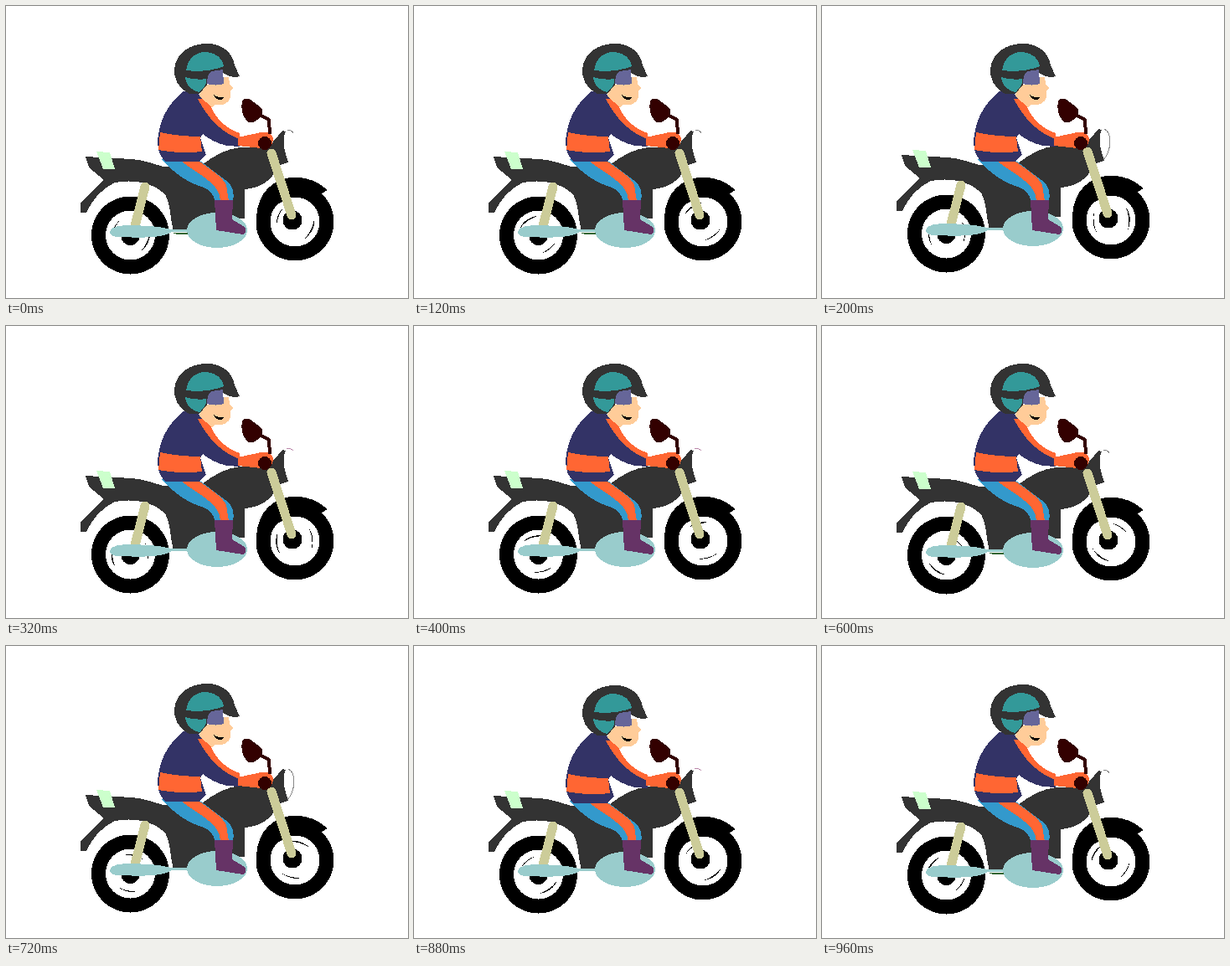
An HTML page that plays this animation: 480 by 349 pixels, repeating every 1000 ms.

```html
<!DOCTYPE html>
<html lang="en">
<head>
<meta charset="utf-8">
<title>Motorbike rider</title>
<style>
  html, body { margin: 0; width: 100%; height: 100%; overflow: hidden; background: #fff; }
  svg { display: block; width: 100vw; height: 100vh; }
</style>
</head>
<body>
<svg viewBox="0 0 480 349" shape-rendering="crispEdges">
  <defs>
    <g id="tyre">
      <circle r="46.5"/>
      <circle r="29.5" fill="#fff"/>
    </g>
    <g id="blades">
      <path d="M23 -4 Q25 9 12 20 Q22 8 23 -4Z"/>
      <path d="M-22 4 Q-23 -8 -13 -18 Q-21 -7 -22 4Z"/>
    </g>
  </defs>

  <g class="bob">
    <g transform="translate(148.5 274)">
      <use href="#tyre"/>
      <use href="#blades" class="spin"/>
      <circle cy="1" r="11"/>
    </g>
    <g transform="translate(345 258)">
      <use href="#tyre"/>
      <use href="#blades" class="spin"/>
      <circle cx="-3" cy="-2" r="11.5"/>
    </g>
    <path d="M299 252 C301 204 352 191 384 220 L374 226 L345 227 L322 238Z"/>

    <!-- frame, seat and tank -->
    <path d="M95 180 L150 183 C165 184 176 189 188 192 L234 190 C248 179 264 170 280 169 L314 168 L330 149 L334 150 C328 162 334 177 337 187 L324 191 C319 209 302 218 285 219 L285 254 L225 256 L218 269 L200 269 C195 251 197 237 190 225 C173 208 146 208 130 211 C114 218 102 233 96 247 L89 247 L89 235 L117 208 L99 193Z" fill="#333"/>
    <path d="M108 174 L124 175 L130 195 L116 195Z" fill="#cfc"/>
  </g>
  <path id="lamp" fill="none" stroke-width="1"/>

  <g class="bob">
    <path d="M166 216 L154 263" stroke="#cc9" stroke-width="11" stroke-linecap="round"/>
    <path d="M317 176 L341 250" stroke="#cc9" stroke-width="11" stroke-linecap="round"/>
    <path id="peg" d="M198 271 H217 V273 H204Z" fill="#363"/>
    <path d="M124 270 C125 260 150 262 172 263 C188 264 194 267 200 267 H222 V270 H198 C188 278 158 277 135 276 Q124 276 124 270Z" fill="#9cc"/>
    <ellipse cx="252" cy="268" rx="36" ry="21" fill="#9cc"/>
  </g>

  <g id="rider">
    <!-- legs -->
    <path d="M186 183 L229 183 L262 208 Q274 216 271 233 L250 233 Q246 221 236 217 Q207 208 186 183Z" fill="#39c"/>
    <path d="M210 186 L229 184 C243 195 259 204 263 214 L266 233 H256 C256 212 230 202 210 186Z" fill="#f63"/>

    <!-- jacket -->
    <path d="M212 102 C223 102 232 106 241 110 Q250 142 279 154 V168 L264 167 Q247 163 235 153 L232 158 L239 178 L230 186 H191 Q176 174 184 144 Q190 120 212 102Z" fill="#336"/>
    <path d="M184 151 Q208 156 232 156 L234 174 Q207 177 182 172Z" fill="#f63"/>
    <path d="M229 111 L241 110 Q250 142 279 152 V159 Q248 148 229 111Z" fill="#f63"/>

    <!-- head -->
    <g transform="translate(0 1)">
      <path d="M240 93 L260 91 L259 84 H266 L267 92 L271 97 L268 100 Q270 114 258 117 L249 117 L246 120 L231 107 L232 102Z" fill="#fc9"/>
      <path d="M219 104 C206 98 200 86 201 74 C203 55 220 44 240 44 C258 44 270 54 273 70 L279 83 Q268 86 258 78 L243 80 L240 93 L231 104Z" fill="#333"/>
      <path d="M215 76 C217 60 229 53 240 54 C251 55 259 62 260 71 Q240 79 215 76Z" fill="#399"/>
      <path d="M214 84 Q227 88 239 86 Q241 93 231 102 Q215 98 214 84Z" fill="#399"/>
      <path d="M245 77 L259 75 L260 92 Q251 95 240 92 Q240 81 245 77Z" fill="#669"/>
      <path d="M248 105 Q253 109 260 108 Q258 112 254 111 Q250 110 248 105Z"/>
    </g>
  </g>
  <path d="M249 232 H271 L270 255 L285 264 Q289 271 283 273 L251 268Z" fill="#636"/>

  <!-- glove, grip and mirror -->
  <path d="M277 157 L300 152 C309 149 319 151 319 159 C319 167 314 171 304 170 L277 167Z" fill="#f63"/>
  <circle cx="309" cy="164" r="8" fill="#300"/>
  <path d="M303 130 L314 136 L315 153" fill="none" stroke="#300" stroke-width="4"/>
  <path d="M282 113 Q286 109 292 112 L304 121 Q309 127 304 132 Q296 142 288 138 Q279 128 282 113Z" fill="#300"/>
</svg>
<script>
  const LOOP = 1000, STEP = 40;
  const all = s => document.querySelectorAll(s);
  const byId = id => document.getElementById(id);

  // [ms, value]
  const turn = [[0, 0], [120, 210], [320, 510], [520, 715], [720, 980], [880, 1110], [960, 1270], [1000, 1440]];
  const dip = [[0, 0], [760, 0], [880, 2], [960, 1], [1000, 0]];
  const jolt = [[0, 0], [140, -1], [200, -2], [280, -1], [420, 0]];

  function lerp(table, t) {
    const i = table.findIndex(k => k[0] > t);
    const [t0, a] = table[i - 1], [t1, b] = table[i];
    return a + (b - a) * (t - t0) / (t1 - t0);
  }

  const held = (table, t) => table.filter(k => k[0] <= t).pop()[1];
  const shift = (el, y) => el.setAttribute("transform", `translate(0 ${y})`);

  function draw(ms) {
    const t = Math.floor(ms % LOOP / STEP) * STEP;
    const y = held(jolt, t % 500);
    all(".bob").forEach(el => shift(el, y));
    all(".spin").forEach(el => el.setAttribute("transform", `rotate(${lerp(turn, t)})`));
    shift(byId("rider"), Math.round(lerp(dip, t)));
    byId("peg").style.display = y ? "none" : "";
    const lamp = byId("lamp");
    lamp.setAttribute("d", y === -2 ? "M337 147 Q344 150 344 163 Q343 176 336 184"
      : y ? "M335 146 Q340 146 343 149" : "M336 148 Q341 148 343 152");
    lamp.setAttribute("stroke", y === -1 ? "#b8a" : "#888");
  }

  const start = performance.now();
  function tick() {
    draw(performance.now() - start);
    requestAnimationFrame(tick);
  }
  draw(0);
  requestAnimationFrame(tick);
</script>
</body>
</html>
```
